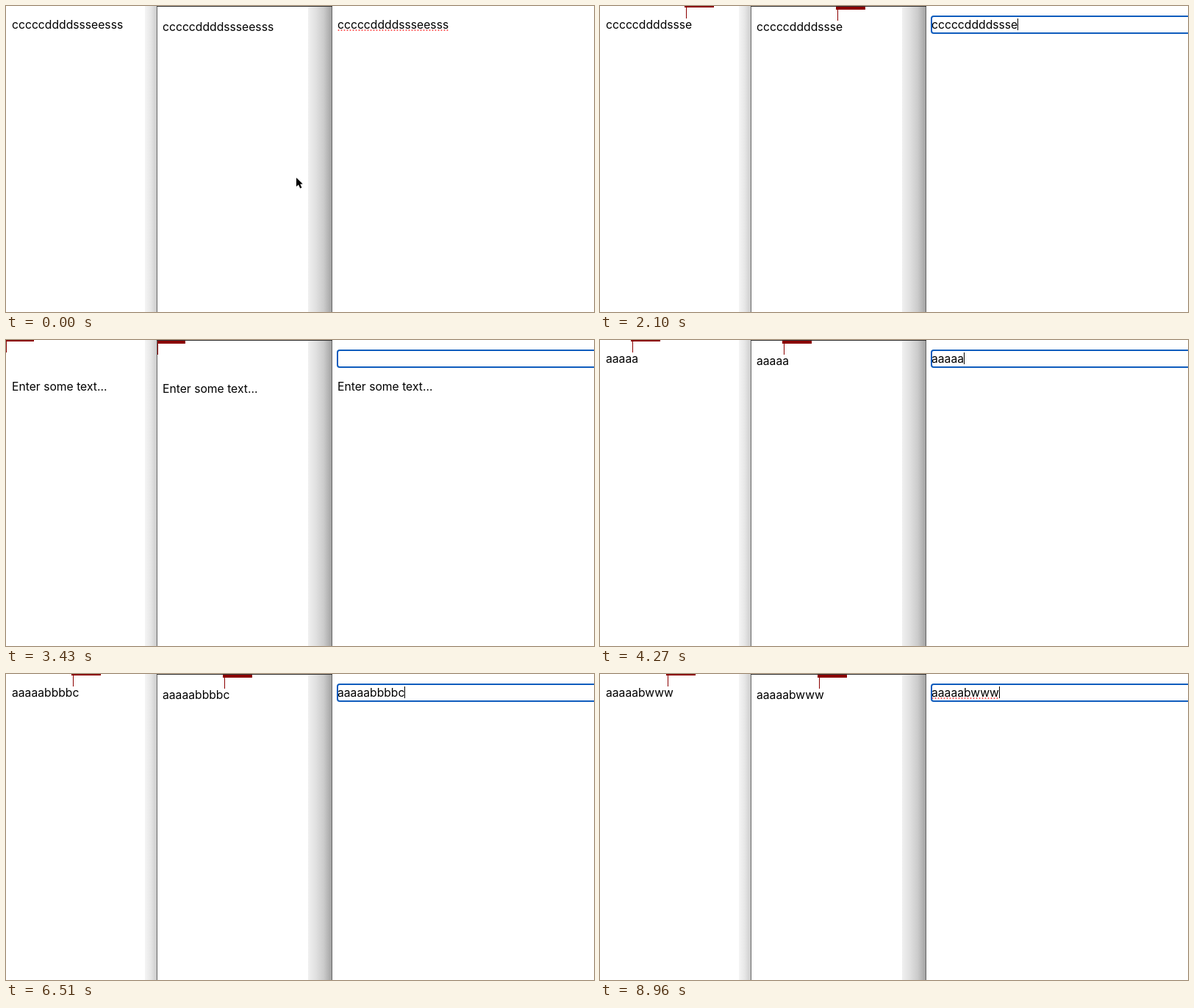
These frames come from a looping animation (800x417 px, 9.24 s). An HTML page with a canvas:

```html
<!DOCTYPE html>
<html lang="en">
<head>
<meta charset="utf-8">
<title>Mirrored input caret</title>
<style>
  html, body { margin: 0; width: 100%; height: 100%; overflow: hidden; background: #fff; }
  canvas { display: block; }
</style>
</head>
<body>
<canvas id="stage" width="800" height="417"></canvas>
<script>
const ctx = document.getElementById('stage').getContext('2d');
const LOOP = 9240, STEP = 70;
const FONT = '15.7px Inter, "Liberation Sans", sans-serif';
const FIRST = 'cccccddddssseesss', SECOND = 'aaaaabbbbcccd', LAST = 'aaaaabwww';
const RED = '#8b0000', BLUE = '#0f5cbd', INK = '#000';
const FOCUS = 700, FIRST_KEY = 1750;

// Each edit: start time, word, number of letters left in the field.
const edits = [[0, FIRST, 17], [1750, FIRST, 16]];
for (let i = 0; i < 9; i++) edits.push([2030 + i * STEP, FIRST, 14 - Math.floor(i * 1.3)]);
[2870, 3010, 3150, 3290].forEach((t, i) => edits.push([t, FIRST, 3 - i]));
[3640, 3780, 3920, 4060, 4200, 4620, 4760, 4900, 5040, 5250, 5460, 5670, 6020]
  .forEach((t, i) => edits.push([t, SECOND, i + 1]));
[6230, 6370, 6510, 6720, 6860, 7070, 7210].forEach((t, i) => edits.push([t, SECOND, 12 - i]));
[7490, 7630, 7770].forEach((t, i) => edits.push([t, LAST, 7 + i]));

function rect(x, y, w, h, color) {
  ctx.fillStyle = color;
  ctx.fillRect(x, y, w, h);
}

function label(text, x, y) {
  ctx.fillStyle = INK;
  ctx.fillText(text, x, y);
}

function shade(x, w, stops) {
  const g = ctx.createLinearGradient(x, 0, x + w, 0);
  stops.forEach((c, i) => g.addColorStop(i / (stops.length - 1), c));
  rect(x, 0, w, 417, g);
}

function panels() {
  rect(0, 0, 800, 417, '#fff');
  shade(189, 16, ['#f5f5f5', '#e6e6e6', '#cccccc']);
  shade(411, 32, ['#f0f0f0', '#e0e0e0', '#cbcbcb', '#a4a4a4']);
  rect(205, 0, 1, 417, '#666');
  rect(443, 0, 1, 417, '#666');
  rect(205, 0, 239, 1, '#333');
}

function marker(left, top, width) {
  const x = left + Math.round(width);
  const start = Math.max(left, x - 2);
  rect(start, top, x + 38 - start, top ? 4 : 2, RED);
  rect(x, top, 1, top ? 19 : 17, RED);
}

function focusRing() {
  ctx.strokeStyle = BLUE;
  ctx.lineWidth = 2;
  ctx.beginPath();
  ctx.roundRect(451, 14, 380, 23, 3);
  ctx.stroke();
}

function squiggle(width) {
  ctx.fillStyle = '#ff4a4a';
  for (let x = 452; x < 451 + width; x += 4) {
    ctx.beginPath();
    ctx.arc(x + 0.5, 33, 1, 0, 7);
    ctx.fill();
  }
}

function arrow(x, y) {
  const outline = [[0, 0], [0, 12], [3, 9.5], [5.2, 14.5], [7.4, 13.5], [5.2, 8.7], [8.7, 8.5]];
  ctx.beginPath();
  outline.forEach(([dx, dy]) => ctx.lineTo(x + dx, y + dy));
  ctx.closePath();
  ctx.strokeStyle = '#fff';
  ctx.lineWidth = 1.5;
  ctx.stroke();
  ctx.fillStyle = INK;
  ctx.fill();
}

function beam(x, y) {
  rect(x, y - 7, 1, 15, INK);
  rect(x - 3, y - 8, 3, 1, INK);
  rect(x + 1, y - 8, 3, 1, INK);
  rect(x - 3, y + 8, 3, 1, INK);
  rect(x + 1, y + 8, 3, 1, INK);
}

function pointer(t) {
  if (t >= FIRST_KEY) return;
  const p = Math.min(t / 490, 1), ease = p * p * (3 - 2 * p);
  const x = Math.round(395 + 232 * ease), y = Math.round(234 - 208 * ease);
  (y < 38 ? beam : arrow)(x, y);
}

function draw(t) {
  const [, word, count] = edits.filter(e => e[0] <= t).pop();
  const text = word.slice(0, count);
  const focused = t >= FOCUS;
  ctx.font = FONT;
  const width = ctx.measureText(text).width;

  panels();
  [[8, 31], [213, 34], [451, 31]].forEach(([x, y]) =>
    text ? label(text, x, y) : label('Enter some text...', x, y + 38));

  if (t < FIRST_KEY || t >= 8680) squiggle(width);
  if (focused) {
    marker(0, 0, width);
    marker(206, 1, width);
    focusRing();
    const blinkedOff = (t >= 1190 && t < FIRST_KEY) || (t >= 8330 && t < 8820);
    if (text && !blinkedOff) rect(451 + Math.round(width), 17, 1, 16, INK);
  }
  pointer(t);
}

function tick() {
  const t = performance.now() % LOOP;
  draw(Math.floor(t / STEP) * STEP);
  requestAnimationFrame(tick);
}
tick();
</script>
</body>
</html>
```
